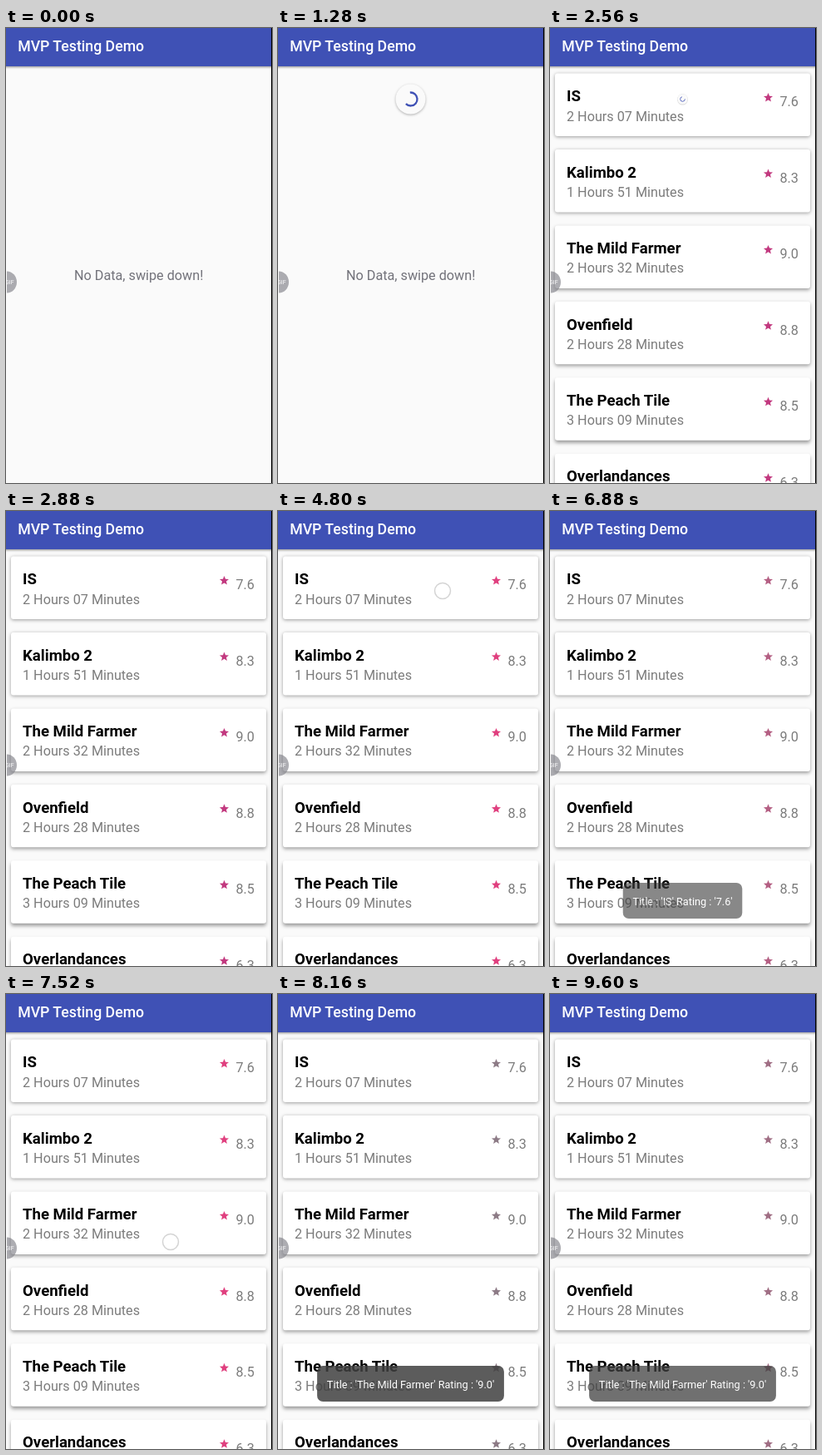
Write an HTML page that moves like this. It is 320 px wide and 547 px high and loops after 9.76 s.

```html
<!DOCTYPE html>
<html lang="en">
<head>
<meta charset="utf-8">
<title>MVP Testing Demo</title>
<style>
  html, body { margin: 0; width: 100%; height: 100%; overflow: hidden; background: #fafafa; }
  svg { display: block; width: 320px; height: 547px; font: 16.2px Roboto, sans-serif; }
  .card { fill: #fff; filter: drop-shadow(0 var(--drop) 2px rgba(0,0,0,.38)); }
  .name { font-size: 18.6px; font-weight: 700; }
  .grey { fill: #7c7c7c; }
  .bar { fill: #3f51b5; filter: drop-shadow(0 1.5px 1.5px rgba(0,0,0,.45)); }
  .heading { font-size: 17.7px; font-weight: 500; fill: #fff; }
  .disc { fill: #fafafa; filter: drop-shadow(0 1px 1.5px rgba(0,0,0,.3)); }
  .toast { font-size: 12.7px; fill: #fff; text-anchor: middle; }
</style>
</head>
<body>
<svg viewBox="0 0 320 547">
  <rect width="320" height="547" fill="#fafafa"/>
  <text id="empty" x="159.7" y="303" text-anchor="middle" fill="#72727a">No Data, swipe down!</text>
  <g id="list"></g>
  <g id="spinner">
    <circle class="disc" r="18"/>
    <circle id="arc" r="8" pathLength="1" fill="none" stroke="#3f51b5" stroke-width="2.3"/>
  </g>
  <rect class="bar" x="-8" y="-8" width="336" height="54"/>
  <text class="heading" x="14.2" y="28">MVP Testing Demo</text>
  <path d="M1 292.5a12 13 0 0 1 0 26z" fill="#76767f" opacity=".6"/>
  <text x="-1" y="308" font-size="7" fill="#fff">GIF</text>
  <g id="toast" class="toast">
    <rect y="447" height="43" rx="7" fill="#404040" fill-opacity=".85"/>
    <text x="159.5" y="474"></text>
  </g>
  <circle id="touch" r="9.5" fill="#fff" fill-opacity=".75" stroke="#d4d4d4" stroke-width="1.5"/>
  <rect x="319" width="1" height="547"/>
</svg>
<script>
const LOOP = 9760, STEP = 160, PULL = 160, SPIN = 1280, LOADED = 2400;
const movies = [
  ['IS', '2 Hours 07 Minutes', '7.6'],
  ['Kalimbo 2', '1 Hours 51 Minutes', '8.3'],
  ['The Mild Farmer', '2 Hours 32 Minutes', '9.0'],
  ['Ovenfield', '2 Hours 28 Minutes', '8.8'],
  ['The Peach Tile', '3 Hours 09 Minutes', '8.5'],
  ['Overlandances', '2 Hours 49 Minutes', '6.3']
];
const toasts = [
  { movie: movies[0], from: 4960, full: 5280, gone: 7200 },
  { movie: movies[2], from: 7680, full: 8160, gone: 9987 }
];
const taps = [{ at: 4800, x: 198, y: 96 }, { at: 7520, x: 198, y: 298 }];

const $ = id => document.getElementById(id);
const clamp = v => Math.max(0, Math.min(1, v));
const ease = v => { v = clamp(v); return v * v * (3 - 2 * v); };
const show = (el, on) => el.setAttribute('visibility', on ? 'visible' : 'hidden');
const place = (el, x, y, scale = 1) =>
  el.setAttribute('transform', `translate(${x} ${y}) scale(${scale})`);

const star = Array.from({ length: 10 }, (_, i) => {
  const a = i * Math.PI / 5, r = i % 2 ? 2.6 : 5.8;
  return `${262.5 + r * Math.sin(a)},${83.8 - r * Math.cos(a)}`;
}).join(' ');

// Shadows fall further the lower a card lies on the screen.
$('list').innerHTML = movies.map(([name, length, rating], i) => `
  <g transform="translate(0 ${i * 91.45})">
    <rect class="card" style="--drop:${1.5 + .4 * i}px" x="6" y="54.5" width="307" height="75.5" rx="3"/>
    <text class="name" x="20" y="88.2">${name}</text>
    <text class="grey" x="20" y="111.6">${length}</text>
    <polygon points="${star}"/>
    <text class="grey" x="276.5" y="94.3">${rating}</text>
  </g>`).join('');
const stars = document.querySelectorAll('polygon');

function drawArc(length, angle, opacity) {
  const arc = $('arc');
  arc.setAttribute('stroke-dasharray', `${length} 1`);
  arc.setAttribute('transform', `rotate(${angle})`);
  arc.setAttribute('opacity', opacity);
}

function drawSpinner(t) {
  show($('spinner'), t >= PULL && t < 2720);
  if (t < SPIN) {
    const p = clamp((t - PULL) / 800);
    place($('spinner'), 159.5, t < 1120 ? 28 + 76 * p : 95);
    drawArc(.8 * p, -90 + 180 * p, .3 + .7 * p);
    return;
  }
  place($('spinner'), 159.5, 85.5, t < LOADED ? 1 : t < 2560 ? .9 : .35);
  const cycle = (t - SPIN) / 1333 + .65, turn = Math.floor(cycle), f = cycle - turn;
  const head = ease(2 * f), tail = ease(2 * f - 1);
  drawArc(.05 + .75 * (head - tail), -95 + 270 * (turn + tail - .216) + .162 * (t - SPIN), 1);
}

function drawTouch(t) {
  const p = (t - PULL) / 800, tap = taps.find(o => t >= o.at && t < o.at + STEP);
  const swiping = p >= 0 && p <= 1;
  show($('touch'), swiping || tap);
  if (swiping) place($('touch'), 206 + 18 * p, 200 + 217 * p);
  else if (tap) place($('touch'), tap.x, tap.y);
}

function drawToast(t) {
  const toast = toasts.find(o => t > o.from && t < o.gone);
  show($('toast'), toast);
  if (!toast) return 0;
  const [box, label] = $('toast').children;
  label.textContent = `Title : '${toast.movie[0]}' Rating : '${toast.movie[2]}'`;
  const width = label.getComputedTextLength() + 23.5;
  box.setAttribute('x', 159.5 - width / 2);
  box.setAttribute('width', width);
  const alpha = clamp(Math.min((t - toast.from) / (toast.full - toast.from), (toast.gone - t) / 440));
  $('toast').setAttribute('opacity', alpha);
  return alpha;
}

// The stars lose their pink while a message is up.
function tintStars(t, alpha) {
  const pink = t < 4800 ? [194, 57, 127] : [224, 64, 127], dull = [141, 123, 134];
  const rgb = pink.map((c, i) => Math.round(c + (dull[i] - c) * alpha ** 2));
  stars.forEach(s => s.setAttribute('fill', `rgb(${rgb})`));
}

function render(now) {
  const t = Math.floor(now % LOOP / STEP) * STEP;
  show($('empty'), t < LOADED);
  show($('list'), t >= LOADED);
  drawSpinner(t);
  drawTouch(t);
  tintStars(t, drawToast(t));
}

let start;
function tick(now) {
  start ??= now;
  render(now - start);
  requestAnimationFrame(tick);
}
render(0);
requestAnimationFrame(tick);
</script>
</body>
</html>
```
